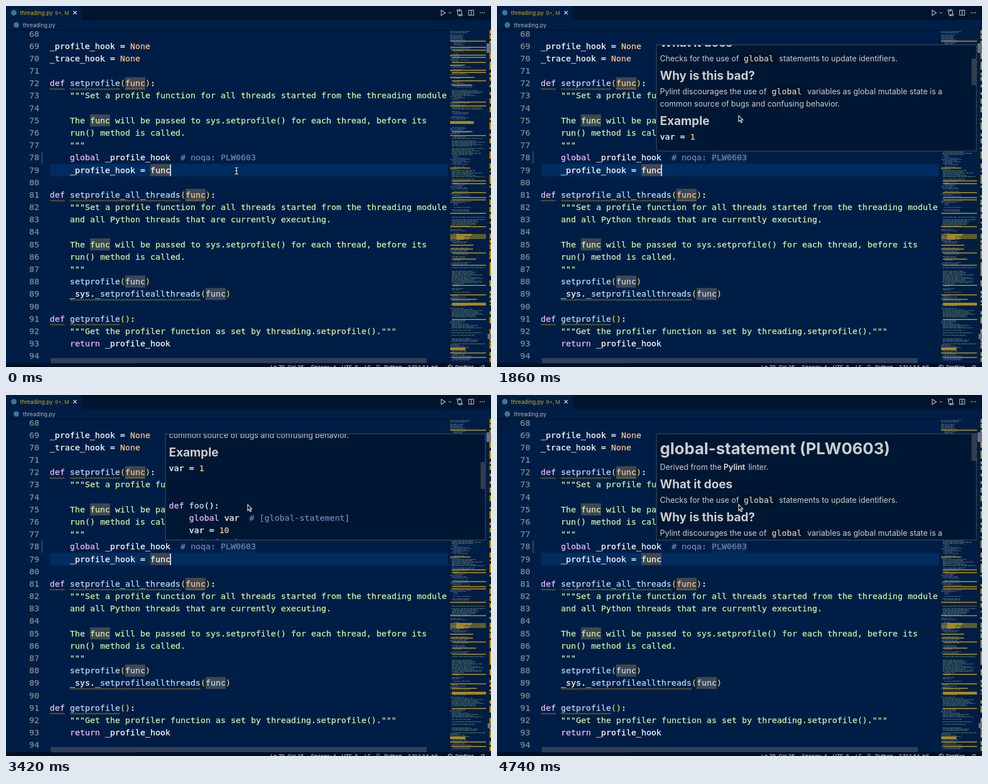
These frames come from a looping animation (867 by 646 pixels, 4.8 s). An HTML page with a canvas:

```html
<!DOCTYPE html>
<html lang="en">
<head>
<meta charset="utf-8">
<title>Editor hover</title>
<style>
html, body { margin: 0; width: 100%; height: 100%; overflow: hidden; background: #001e45; }
canvas { display: block; }
</style>
</head>
<body>
<canvas id="stage" width="867" height="646"></canvas>
<script>
const W = 867, H = 646, LOOP = 4800, STEP = 60;
const ADV = 8.985, ROW = 22.185, LEFT = 78.3;
const MONO = '14.92px "DejaVu Sans Mono", monospace';
const sans = (size, weight = 400) => `${weight} ${size}px Inter, sans-serif`;
const C = {
  bg: '#001e45', text: '#ffffff', keyword: '#ebbbff', fn: '#bbdaff', value: '#ffc58f', bracket: '#f5d12a',
  doc: '#d1f1a9', comment: '#7285b7', number: '#858d93', warn: '#d0a70e', prose: '#cccccc'
};

const source = `
_profile_hook = None
_trace_hook = None

def setprofile(func):
    """Set a profile function for all threads started from the threading module

    The func will be passed to sys.setprofile() for each thread, before its
    run() method is called.
    """
    global _profile_hook  # noqa: PLW0603
    _profile_hook = func

def setprofile_all_threads(func):
    """Set a profile function for all threads started from the threading module
    and all Python threads that are currently executing.

    The func will be passed to sys.setprofile() for each thread, before its
    run() method is called.
    """
    setprofile(func)
    _sys._setprofileallthreads(func)

def getprofile():
    """Get the profiler function as set by threading.setprofile()."""
    return _profile_hook
`.split('\n');

const example = `var = 1


def foo():
    global var  # [global-statement]
    var = 10
    print(var)


foo()
print(var)`.split('\n');

const fixed = `var = 1


def foo():
    print(var)
    return 10


var = foo()
print(var)`.split('\n');

function rect(g, color, x, y, w, h) {
  g.fillStyle = color;
  g.fillRect(x, y, w, h);
}

function label(g, text, x, y, font, color, align = 'left') {
  g.font = font;
  g.fillStyle = color;
  g.textAlign = align;
  g.fillText(text, x, y);
}

// Code is set slightly heavier than the plain font.
function mono(g, text, x, y, color, align) {
  label(g, text, x, y, MONO, color, align);
  g.strokeStyle = color;
  g.lineWidth = 0.25;
  g.strokeText(text, x, y);
}

function stroke(g, color, width, path) {
  g.strokeStyle = color;
  g.lineWidth = width;
  g.stroke(new Path2D(path));
}

function random(seed) {
  return () => (seed = (seed * 16807) % 2147483647) / 2147483647;
}

function tokenColor(line, token, at, bracket) {
  const isDef = line.startsWith('def');
  const inCall = line.slice(0, at).includes('(');
  if (token[0] === '#') return C.comment;
  if (/^(def|global|return)$/.test(token)) return C.keyword;
  if (/^(None|\d+)$/.test(token)) return C.value;
  if (/^\w/.test(token)) {
    if (line[at + token.length] === '(') return C.fn;
    return inCall ? (isDef ? C.value : C.fn) : C.text;
  }
  if (!/[()]/.test(token)) return C.text;
  return bracket || (isDef ? C.text : C.fn);
}

function codeLine(g, line, x, y, { isDoc = false, bracket = '' } = {}) {
  const pattern = isDoc ? /\S+/g : /#.*|\w+|[()]|[^\w\s()]+/g;
  for (const m of line.matchAll(pattern)) {
    const color = isDoc ? C.doc : tokenColor(line, m[0], m.index, bracket);
    for (const word of m[0].matchAll(/\S+/g)) {
      mono(g, word[0], x + (m.index + word.index) * ADV, y, color);
    }
  }
}

function squiggle(g, x, y, w) {
  let path = `M${x} ${y}`;
  for (let i = 0; i <= w; i += 0.5) path += `L${x + i} ${y - Math.sin(i * Math.PI / 2.3)}`;
  stroke(g, C.warn, 1, path);
}

function drawEditor(g) {
  rect(g, '#002c5f', 79, 282.5, 711, 22.5);
  rect(g, '#1b507a', 63.5, 260.5, 2, 22);
  let inDoc = false;
  source.forEach((line, i) => {
    const mid = 49.2 + i * ROW, quotes = line.split('"""').length - 1;
    const isDoc = inDoc || quotes > 0;
    mono(g, 68 + i, 59.5, mid + 5.3, C.number, 'right');
    for (const m of line.matchAll(/\bfunc\b/g)) {
      rect(g, '#3f4751', LEFT + m.index * ADV, mid - 10.5, 4 * ADV, 21.5);
    }
    if (!isDoc && /^def|_sys/.test(line)) {
      for (const m of line.matchAll(/[\w.]+/g)) {
        if (line.startsWith('def') || m[0] !== 'func') {
          squiggle(g, LEFT + m.index * ADV, mid + 10.8, m[0].replace(':', '').length * ADV);
        }
      }
    }
    codeLine(g, line, LEFT, mid + 5.3, { isDoc, bracket: C.bracket });
    if (quotes === 1) inDoc = !inDoc;
  });
  rect(g, '#2f405a', 80, 630, 672, 9);
}

function drawMinimap(g) {
  const rnd = random(71);
  const docs = [[148, 161], [181, 188], [236, 266], [292, 310], [376, 392], [462, 496], [543, 556], [570, 606]];
  rect(g, '#00193b', 791, 42, 2, 597);
  for (let y = 43; y < 637; y += 2.2) {
    const isDoc = docs.some(([a, b]) => y >= a && y <= b);
    const gap = rnd() < 0.25, indent = y < 62 ? 0 : isDoc ? 3 : Math.floor(rnd() * 3) * 3;
    const end = 794 + (isDoc ? 36 + rnd() * 27 : 14 + rnd() * 26);
    const color = isDoc ? '#5e7a70' : ['#566d8c', '#5f7080', '#576b95'][Math.floor(rnd() * 3)];
    for (let x = 794 + indent; x < end && !gap;) {
      const w = 1.5 + rnd() * 5;
      rect(g, color, x, y, Math.min(w, end - x), 1.1);
      x += w + 1;
    }
  }
  const bars = [62, 73, 78, 87, 91, 100, 105, 114, 118, 127, 133, 141, 171, 178, 206, 224, 231,
    289, 312, 317, 333, 342, 346, 370, 394, 427, 434, 441, 452, 463, 499, 516, 524, 531, 560, 611, 620, 628];
  for (const y of bars) {
    const x = 794 + Math.floor(rnd() * 2) * 3, tall = y === 206 || y === 531 || y === 611;
    rect(g, '#a98a12', x, y, rnd() < 0.7 ? 858 - x : 25 + rnd() * 20, tall ? 5 : 1.8);
  }
  rect(g, 'rgba(175,145,20,.55)', 794, 408, 64, 9);
  for (let y = 408; y < 417; y += 2.2) rect(g, '#cfab25', 805, y, 12 + rnd() * 18, 1.2);

  for (let y = 43; y < 632; y += 5 + rnd() * 12) rect(g, '#c39c0c', 864.5, y, 2.5, 2 + rnd() * 8);
  rect(g, '#68727d', 859, 67, 8, 17);
  rect(g, '#68727d', 861, 587, 6, 9);
}

function drawChrome(g) {
  rect(g, C.bg, 0, 0, W, 42);
  rect(g, '#00142d', 135, 0, W - 135, 24.5);
  const shade = g.createLinearGradient(0, 42, 0, 46);
  shade.addColorStop(0, 'rgba(0,0,0,.35)');
  shade.addColorStop(1, 'rgba(0,0,0,0)');
  rect(g, shade, 0, 42, 790, 4);
  for (const [x, y] of [[14, 12], [18.5, 34]]) {
    g.fillStyle = '#3f7296';
    g.beginPath();
    g.arc(x, y, 5, 0, 7);
    g.fill();
  }
  label(g, 'threading.py', 25, 16, sans(9.9), '#d3aa18');
  label(g, '9+, M', 87.5, 15.8, sans(9.2), '#b8951c');
  label(g, 'threading.py', 30, 37.7, sans(9.8), '#a9b4c2');
  stroke(g, '#e6ebf2', 1.1, 'M120.3 9l6 6m0-6l-6 6');

  const icon = '#c3cad3';
  stroke(g, icon, 1.1, 'M778 7.5v9.5l7.5-4.75z');
  stroke(g, icon, 1, 'M791 11l2.5 2.5L796 11');
  stroke(g, icon, 1.1, 'M807.5 10v5q0 1.5 1.5 1.5h3m-2-2l2 2-2 2M814.5 14V9q0-1.5-1.5-1.5h-3m2-2l-2 2 2 2'
    + 'M806 8a1.5 1.5 0 1 0 3 0a1.5 1.5 0 1 0-3 0M813 16a1.5 1.5 0 1 0 3 0a1.5 1.5 0 1 0-3 0');
  stroke(g, icon, 1.1, 'M827 7.5h9v9h-9zM831.5 7.5v9');
  for (const x of [847, 850.5, 854]) rect(g, icon, x, 11.3, 1.6, 1.6);

  rect(g, '#000f22', 0, 639, W, 7);
  rect(g, '#28384f', 80, 638, 151, 1.5);
  const status = [['Ln 79, Col 25', 473], ['Spaces: 4', 545], ['UTF-8', 600], ['LF', 641], ['{}', 661],
    ['Python', 676], ['3.10.1 64-bit', 718], ['Prettier', 803]];
  for (const [text, x] of status) label(g, text, x, 650, sans(9.6), '#e8ecf2');
  stroke(g, '#e8ecf2', 1, 'M790 646.5a4 4 0 1 0 8 0a4 4 0 1 0-8 0M791.5 643.5l5.5 6M848 647l3-3.5h3.5v4');
}

function inlineCode(g, x, mid) {
  g.fillStyle = '#041226';
  g.beginPath();
  g.roundRect(x - 5, mid - 9.5, 64, 19, 2);
  g.fill();
  mono(g, 'global', x, mid + 5.3, C.prose);
}

function drawHover(g, scroll) {
  const x = 291.3, top = 69, height = 191;
  const body = sans(13.9);
  const prose = (text, px, mid, font = body) => label(g, text, px, mid + 4.9, font, C.prose);
  const heading = (text, mid) => label(g, text, x, mid + 7.5, sans(21.2, 700), C.prose);
  const block = (lines, mid) => lines.forEach((line, i) => codeLine(g, line, x, mid + 5.3 + i * ROW));

  rect(g, '#001733', 285, top, 572, height);
  g.save();
  g.beginPath();
  g.rect(285, top + 1, 572, height - 2);
  g.clip();
  g.translate(0, -scroll);
  label(g, 'global-statement (PLW0603)', x, 106.3, sans(28.8, 700), C.prose);
  prose('Derived from the ', x, 129);
  prose('Pylint', 405, 129, sans(13.9, 700));
  prose('linter.', 449.5, 129);
  heading('What it does', 159);
  prose('Checks for the use of', x, 188);
  inlineCode(g, 441, 188);
  prose('statements to update identifiers.', 504.3, 188);
  heading('Why is this bad?', 218);
  prose('Pylint discourages the use of', x, 247);
  inlineCode(g, 491, 247);
  prose('variables as global mutable state is a', 554.7, 247);
  prose('common source of bugs and confusing behavior.', x, 269);
  heading('Example', 299);
  block(example, 328);
  prose('Use instead:', x, 579);
  block(fixed, 607.3);
  g.restore();

  rect(g, 'rgba(121,121,121,.4)', 848.5, top + 1 + scroll * 0.2535, 8, 48);
  g.strokeStyle = '#40506a';
  g.lineWidth = 1;
  g.strokeRect(285, top + 0.5, 572, height - 1);
}

// Smooth curve through [time, value] points, level at turning points and rests.
function curve(points, t) {
  const last = points.length - 1;
  if (t <= points[0][0]) return points[0][1];
  if (t >= points[last][0]) return points[last][1];
  const i = points.findIndex(p => p[0] > t) - 1;
  const slope = k => (points[k + 1][1] - points[k][1]) / (points[k + 1][0] - points[k][0]);
  const tangent = k => {
    if (k === 0 || k === last) return 0;
    const a = slope(k - 1), b = slope(k);
    return a * b <= 0 ? 0 : 2 * a * b / (a + b);
  };
  const [t0, a] = points[i], [t1, b] = points[i + 1], d = t1 - t0, u = (t - t0) / d;
  const ease = u * u * (3 - 2 * u);
  return a + (b - a) * ease + d * u * (1 - u) * ((1 - u) * tangent(i) - u * tangent(i + 1));
}

const scrollPath = [[1620, 0], [2220, 349], [2700, 561.5], [3060, 561.5], [3420, 197], [3900, 36], [4200, 0]];
const mouseX = [[240, 412], [600, 413], [1260, 413], [1620, 432]];
const mouseY = [[240, 295], [600, 279], [1260, 279], [1620, 196]];

function drawMouse(g, x, y) {
  if (y > 260) {
    const beam = `M${x - 3} ${y - 6}q3 0 3 2v8q0 2-3 2m6-12q-3 0-3 2v8q0 2 3 2m-5-6h4`;
    stroke(g, '#00122a', 2.6, beam);
    stroke(g, '#ffffff', 1.1, beam);
    return;
  }
  const arrow = new Path2D(`M${x} ${y}v10.8l2.5-2.3 1.8 4.2 1.8-.8-1.8-4h3.4z`);
  g.fillStyle = '#05080d';
  g.fill(arrow);
  g.strokeStyle = '#f2f4f7';
  g.lineWidth = 1.1;
  g.stroke(arrow);
}

const still = document.createElement('canvas');
still.width = W;
still.height = H;
const base = still.getContext('2d');
rect(base, C.bg, 0, 0, W, H);
drawEditor(base);
drawMinimap(base);
drawChrome(base);

const stage = document.getElementById('stage').getContext('2d');

function render(t) {
  stage.drawImage(still, 0, 0);
  if ((t / 800 + 0.03) % 1 < 0.5) rect(stage, '#ffffff', 293.3, 283.5, 1.6, 21);
  if (t >= 900) {
    rect(stage, 'rgba(60,110,160,.1)', LEFT + 34 * ADV, 260.5, 7 * ADV, 22);
    drawHover(stage, curve(scrollPath, t));
  }
  drawMouse(stage, curve(mouseX, t), curve(mouseY, t));
}

function tick() {
  const t = performance.now() % LOOP;
  render(Math.floor(t / STEP) * STEP);
  requestAnimationFrame(tick);
}
tick();
</script>
</body>
</html>
```
